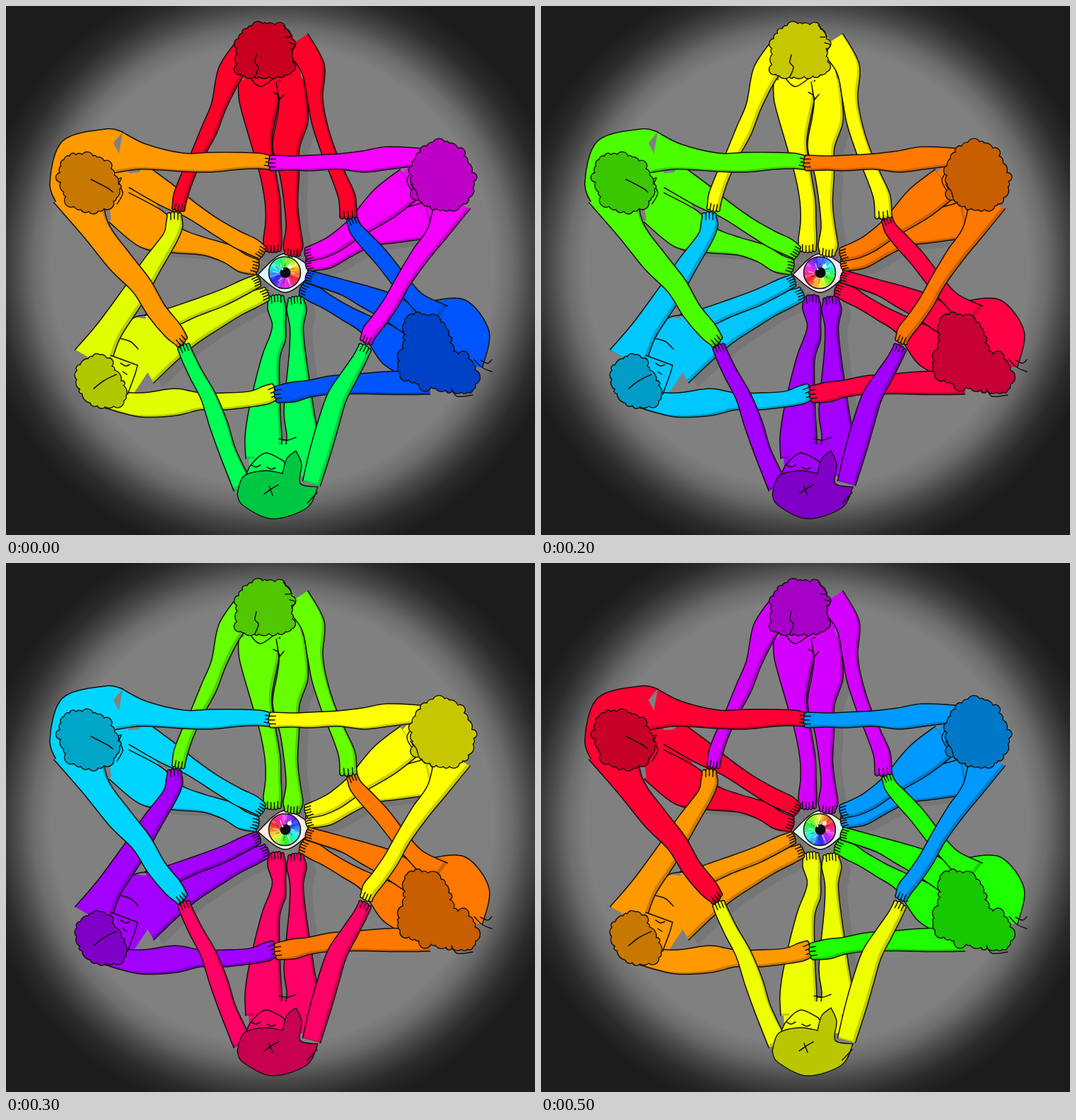
Recreate the animation shown at these times as an HTML page. Size 748 by 748 pixels, loop 0.6 s.

```html
<!DOCTYPE html>
<html lang="en">
<head>
<meta charset="utf-8">
<title>Colour circle</title>
<style>
html, body { margin: 0; width: 100%; height: 100%; overflow: hidden; background: #1b1b1b; }
svg { display: block; width: 100vw; height: 100vh; }
path { stroke-linejoin: round; stroke-linecap: round; }
.fill { fill: currentColor; }
.line { fill: none; stroke: #14100c; stroke-width: 1.5; }
.shade { fill: #000; fill-opacity: .2; fill-rule: evenodd; }
.hair { fill: #000; fill-opacity: .22; stroke: #14100c; stroke-width: 1.4; }
#floor { opacity: .07; }
</style>
</head>
<body>
<svg id="art" viewBox="0 0 748 748">
  <defs>
    <radialGradient id="spot" gradientUnits="userSpaceOnUse" cx="377" cy="368" r="440">
      <stop offset=".71" stop-color="#808080"/>
      <stop offset=".77" stop-color="#6c6c6c"/>
      <stop offset=".83" stop-color="#484848"/>
      <stop offset=".89" stop-color="#2b2b2b"/>
      <stop offset=".96" stop-color="#1c1c1c"/>
    </radialGradient>
  </defs>
  <rect width="748" height="748" fill="url(#spot)"/>
  <g id="floor" transform="translate(13 7)"></g>
</svg>
<script>
const STEP = 100, COUNT = 6;
const art = document.getElementById('art');
const floor = document.getElementById('floor');
const steps = fn => Array.from({ length: COUNT }, (_, i) => fn(i));

// Colour of each figure at each step, clockwise from the top.
const colors = {
  a: ['#ff0029', '#ff9100', '#ffff00', '#66ff00', '#00ccff', '#d400ff'],
  b: ['#f500ff', '#ff0048', '#ff7800', '#ffff00', '#59ff00', '#0099ff'],
  c: ['#0055ff', '#b700ff', '#ff0044', '#ff7800', '#ffee00', '#1eff00'],
  d: ['#00ff55', '#0099ff', '#a200ff', '#ff0066', '#ff9100', '#eeff00'],
  e: ['#e1ff00', '#1eff00', '#00c8ff', '#a200ff', '#ff0066', '#ff9900'],
  f: ['#ff9900', '#d4ff00', '#4cff00', '#00d5ff', '#9900ff', '#ff0033']
};

function node(tag, attrs, parent = art) {
  const el = document.createElementNS('http://www.w3.org/2000/svg', tag);
  for (const k in attrs) el.setAttribute(k, attrs[k]);
  parent.append(el);
  return el;
}

function add(cls, d, list) {
  const el = node('path', { class: cls, d });
  if (list) {
    const frames = [...list, list[0]].map((color, i) => ({ color, offset: i / COUNT, easing: 'step-end' }));
    el.animate(frames, { duration: STEP * COUNT, iterations: Infinity });
  }
  return el;
}

const nums = text => text.trim().split(/\s+/).map(Number);
function group(text, size) {
  const n = nums(text), out = [];
  for (let i = 0; i < n.length; i += size) out.push(n.slice(i, i + size));
  return out;
}

// Smooth segments through points, without the first move.
function smooth(p) {
  let d = '';
  for (let i = 0; i < p.length - 1; i++) {
    const [a, b, c, e] = [p[i - 1] || p[i], p[i], p[i + 1], p[i + 2] || p[i + 1]];
    const c1 = b.map((v, k) => v + (c[k] - a[k]) / 6);
    const c2 = c.map((v, k) => v - (e[k] - b[k]) / 6);
    d += `C${c1} ${c2} ${c}`;
  }
  return d;
}

// "/" makes a corner, "|" lifts the pen.
function curve(text) {
  return text.split('|').map(part => {
    let last, d = '';
    for (const seg of part.split('/')) {
      const p = group(seg, 2);
      if (last) p.unshift(last); else d = 'M' + p[0];
      d += smooth(p);
      last = p[p.length - 1];
    }
    return d;
  }).join('');
}

const line = text => add('line', curve(text));
const fill = (who, text) => add('fill', curve(text), colors[who]);
function body(who, text) {
  fill(who, text);
  line(text);
}

// A limb from its middle line: x, y and half width at each joint, ending in toes or fingers.
let clips = 0;
function limb(who, tips, text) {
  const p = group(text, 3), left = [], right = [];
  let dir;
  p.forEach(([x, y, w], i) => {
    const a = p[Math.max(i - 1, 0)], b = p[Math.min(i + 1, p.length - 1)];
    const len = Math.hypot(b[0] - a[0], b[1] - a[1]);
    dir = [(b[0] - a[0]) / len, (b[1] - a[1]) / len];
    left.push([x + dir[1] * w, y - dir[0] * w]);
    right.unshift([x - dir[1] * w, y + dir[0] * w]);
  });
  const from = left[left.length - 1], to = right[0];
  let cap = '', ticks = '';
  const r = Math.hypot(to[0] - from[0], to[1] - from[1]) / tips * .52;
  for (let k = 1; k <= tips; k++) {
    const push = k < tips ? 4 * Math.sin(k / tips * Math.PI) : 0;
    const q = from.map((v, j) => v + (to[j] - v) * k / tips + dir[j] * push);
    cap += `A${r} ${r * 1.2} 0 0 1 ${q}`;
    if (k < tips) ticks += `M${q}L${q.map((v, j) => v - dir[j] * 8)}`;
  }
  const d = 'M' + left[0] + smooth(left) + cap + smooth(right);
  add('fill', d, colors[who]);
  const id = 'k' + clips++;
  node('path', { d }, node('clipPath', { id }));
  const g = node('g', { 'clip-path': `url(#${id})` });
  node('path', { class: 'shade', d: `M-9 -9H800V800H-9Z${d}Z`, transform: 'translate(-4 -3)' }, g);
  add('line', d + ticks);
  return d;
}

function leg(who, text) {
  node('path', { d: limb(who, 5, text) }, floor);
}
const arm = (who, text) => limb(who, 4, text);

// Head of curls: a smooth closed line broken into small bumps.
function curls(text) {
  const p = group(text, 2), n = p.length, pts = [];
  for (let i = 0; i < n; i++) {
    const [a, b, c, e] = [-1, 0, 1, 2].map(k => p[(i + k + n) % n]);
    const parts = Math.max(1, Math.round(Math.hypot(c[0] - b[0], c[1] - b[1]) / 11));
    for (let k = 0; k < parts; k++) {
      const t = (k + .25 * Math.sin(i * 5 + k * 3)) / parts;
      pts.push(b.map((v, j) => v + .5 * t * (c[j] - a[j] + t * (2 * a[j] - 5 * v + 4 * c[j] - e[j]
        + t * (3 * v - a[j] - 3 * c[j] + e[j])))));
    }
  }
  return 'M' + pts[0] + pts.map((q, i) => {
    const m = pts[(i + 1) % pts.length];
    const r = Math.hypot(m[0] - q[0], m[1] - q[1]) * (.65 + .15 * Math.sin(i * 4));
    return `A${r} ${r} 0 0 1 ${m}`;
  }).join('') + 'Z';
}
function hair(who, d) {
  add('fill', d, colors[who]);
  add('hair', d);
}

function eye(cx, cy, r) {
  const white = curve('356 380 394 350 438 374 / 396 405 356 380');
  add('fill', white, steps(i => `hsl(${200 + i * 60} 80% 94%)`));
  add('line', white);
  const n = 36;
  const at = (k, q) => {
    const t = k / n * 2 * Math.PI;
    return [cx + q * Math.sin(t), cy - q * Math.cos(t)];
  };
  for (let k = 0; k < n; k++) {
    const hues = steps(i => `hsl(${110 - k * 10 + i * 60} 90% ${k % 5 ? 56 : 66}%)`);
    add('fill', `M${cx} ${cy}L${at(k, r)}L${at(k + 1.3, r)}Z`, hues);
  }
  for (let k = 0; k < n; k += 3) {
    add('line', `M${at(k, 9)}L${at(k + .5, 13 + k % 4)}`).style.stroke = k % 2 ? '#fff9' : '#0005';
  }
  node('circle', { cx, cy, r, class: 'line' });
  node('circle', { cx: cx + 1, cy, r: 7.5, fill: '#0b0b12' });
  node('circle', { cx: cx + 7, cy: cy - 9, r: 3, fill: '#fffd' });
  node('circle', { cx: cx - 3, cy: cy - 5, r: 1.5, fill: '#fffd' });
}
eye(394, 377, 22.5);

// Torsos and legs
fill('a', '340 40 / 405 40 / 424 130 / 335 130');
leg('a', '358 105 29 358 135 28 361 192 15 370 235 11.5 377 275 11 378 305 11 377 330 13 377 343 12');
leg('a', '402 105 20 406 135 20 405 162 22 396 200 19 401 240 13.5 403 280 9.5 406 312 10 406 338 14 405 349 11');
line('387 133 385 126 378 122 | 387 132 393 125');

fill('b', '568 228 / 535 262 / 545 325 / 615 315');
leg('b', '600 302 26 550 313 22 512 325 16 482 344 12 455 360 11 428 366 9');
leg('b', '572 250 24 535 279 24 495 313 15 466 335 13 446 345 12 427 351 10');

fill('c', '580 420 / 602 417 / 674 510 / 570 520 / 545 440');
body('c', '600 417 650 416 683 460 674 510');
leg('c', '590 500 34 548 482 28 512 452 14 482 435 11 455 419 10.5 438 409 12 420 401 10');
leg('c', '575 447 20 540 425 19 506 410 15 480 399 11 455 391 10 428 383 9');

fill('d', '341 615 / 436 615 / 425 665 / 345 665');
leg('d', '364 640 25 364 609 26 366 570 22 374 500 13 384 470 11.5 386 450 9.5 383 428 13 382 414 11');
leg('d', '415 640 22 419 608 22 414 570 21 412 490 11.5 411 455 9.5 411 430 14 410 416 11');
fill('d', '350 620 / 430 620 / 420 652 / 352 652');
line('386 612 398 614 410 610');

fill('e', '130 485 / 183 440 / 245 450 / 178 552 / 150 540');
leg('e', '190 500 38 225 480 28 262 461 18 298 441 15 326 426 13 350 415 12 367 408 10');
leg('e', '200 450 14 230 442 14 265 428 12 305 413 11.5 340 396 10.5 355 389 9');
fill('e', '155 480 / 185 445 / 225 450 / 205 490 / 175 530');
line('155 469 175 474 187 485 | 160 451 185 439 200 437');

fill('f', '140 240 / 190 235 / 215 285 / 150 310');
leg('f', '160 285 25 205 315 30 243 332 18 280 340 12.5 312 350 13 335 364 13 353 369 11');
leg('f', '185 240 20 228 268 17 262 289 12 295 311 11 325 329 12 348 340 12 361 348 10');

// Lower arms first, then those that cross over them
arm('e', '122 500 28 145 460 19 178 412 17 208 364 14 232 328 11 238 310 12 238 297 10');
arm('c', '612 440 20 582 417 12 560 393 11.5 532 357 11.5 510 333 11 495 316 9.5 490 304 8');
arm('e', '140 556 12 190 564 17 240 560 19 275 559 12 310 559 12 345 556 11 368 550 13 378 546 12');
arm('c', '600 535 14 550 533 16.5 505 534 14.5 460 536 13 430 541 12 405 546 14 384 549 12');
arm('d', '335 680 14 314 632 12 301 593 13 286 552 11 269 521 10 257 496 9.5 252 484 9');
arm('d', '432 675 13 445 628 15 456 590 15 468 553 14 485 524 12 500 499 10 507 485 9.5');
arm('a', '343 60 20 317 95 18 301 141 11 287 176 11.5 271 210 9.5 256 243 9.5 247 268 10 244 285 9');
arm('a', '410 50 20 434 88 17 437 130 11 443 165 10.5 456 206 10 471 242 10.5 482 270 12 484 295 12');

fill('f', '64 250 / 150 190 / 175 238 / 130 300 / 90 290');
body('f', '75 285 62 250 80 191 140 174 165 178');
arm('f', '160 207 29 195 213 18 250 221 13 290 221 14 330 219 12 357 219 11 371 221 10');
arm('f', '100 262 36 127 316 20 161 361 18 192 396 15 213 431 14 236 459 13.5 248 473 10');
arm('b', '588 213 12 540 215 16 505 220 15 470 220 11 430 222 11 405 222 10 376 222 11');
arm('b', '632 275 27 610 320 15 586 352 13 561 390 11 545 419 11 527 445 11 515 460 11 510 472 9');

// Heads
body('a', '343 98 360 114 388 94');
hair('a', curls('329 46 350 27 382 27 402 40 403 68 404 93 370 100 331 96 327 70'));
line('354 69 352 80 357 87 352 100 | 392 27 404 42 395 44 | 401 52 409 55 404 64');

body('b', '578 228 567 246 576 264 592 283');
hair('b', curls('579 216 606 192 640 202 661 246 648 278 618 288 582 272 574 238'));
line('572 252 580 262 583 272');

hair('c', curls('567 440 600 439 622 455 632 487 660 505 660 543 620 543 568 528 555 510 564 475'));
line('662 500 673 511 687 517 | 671 501 681 505 687 500 | 630 541 638 552 660 550');

body('d', '340 662 347 648 367 632 392 643 / 398 655 390 668');
hair('d', curve('327 690 336 665 366 657 391 661 / 397 640 410 629 / 418 648 416 675 441 680 / 425 710 376 725 335 706 327 690'));
line('347 649 353 652 360 649 | 369 652 375 655 381 653 | 365 690 375 683 385 677 | 372 679 377 692 | 426 703 440 688');

body('e', '148 494 186 508 / 182 522 172 549');
hair('e', curls('100 528 106 506 134 493 149 508 170 548 152 566 117 560'));
line('124 541 138 530 156 521 | 162 505 169 509 175 507 | 165 517 171 521');

body('f', '155 247 163 243 160 252 165 265 157 280');
hair('f', curls('82 217 110 210 140 220 158 250 157 270 130 290 94 282 77 248'));
line('120 245 143 257 151 263');
</script>
</body>
</html>
```
